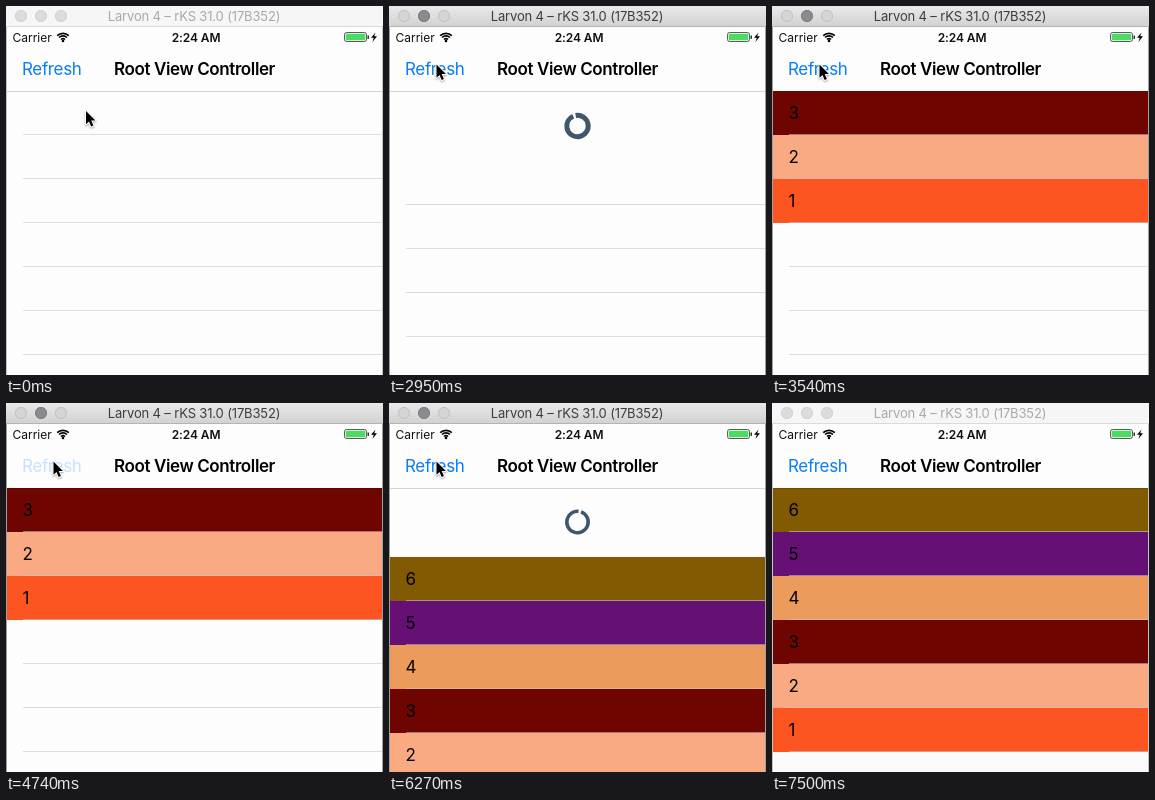
These frames come from a looping animation (377 by 369 pixels, 7540 ms). An HTML page with a canvas:

```html
<!DOCTYPE html>
<html lang="en">
<head>
<meta charset="utf-8">
<title>Pull to refresh</title>
<style>
  html, body { margin: 0; width: 100%; height: 100%; overflow: hidden; background: #fdfdfd; }
  canvas { display: block; width: 377px; height: 369px; }
</style>
</head>
<body>
<canvas></canvas>
<script>
const W = 377, H = 369, LOOP = 7540;
const NAV_BOTTOM = 85, ROW = 44, PULL = 70;
const PRESSES = [1530, 4740];
const FOCUS_START = 1530, FOCUS_END = 7500;
const LOADED = 1500, CLOSE_TIME = 430;
const OPEN = 225, OPEN_TIME = 400;
const FONT = 'Inter, Roboto, sans-serif';
const ROW_COLORS = ['#fc5522', '#f9aa82', '#6e0500', '#ec9b5c', '#661076', '#815a02'];
// time, x, y of the pointer tip
const POINTER = [
  [60, 80, 105], [230, 62, 89], [340, 44, 72], [460, 32, 60], [580, 38, 57],
  [700, 46, 57], [880, 46, 57], [1180, 47.5, 58.5]
];

const canvas = document.querySelector('canvas');
const ctx = canvas.getContext('2d');
const scale = window.devicePixelRatio || 1;
canvas.width = W * scale;
canvas.height = H * scale;

const clamp = v => Math.max(0, Math.min(1, v));
const ease = v => { const p = clamp(v); return p * p * (3 - 2 * p); };

function rect(x, y, w, h, color) {
  ctx.fillStyle = color;
  ctx.fillRect(x, y, w, h);
}

function text(str, x, y, size, color, { weight = 400, align = 'left', spacing = 0 } = {}) {
  ctx.font = `${weight} ${size}px ${FONT}`;
  ctx.textAlign = align;
  ctx.letterSpacing = spacing + 'px';
  ctx.fillStyle = color;
  ctx.fillText(str, x, y);
}

function arc(x, y, r, from, to, width, color) {
  ctx.beginPath();
  ctx.arc(x, y, r, from, to);
  ctx.lineWidth = width;
  ctx.strokeStyle = color;
  ctx.stroke();
}

function polygon(points) {
  ctx.beginPath();
  points.forEach(([x, y]) => ctx.lineTo(x, y));
  ctx.closePath();
}

function titleBar(active) {
  const fill = ctx.createLinearGradient(0, 0, 0, 20);
  fill.addColorStop(0, active ? '#e9e9e9' : '#f6f6f6');
  fill.addColorStop(1, active ? '#d2d2d2' : '#f6f6f6');
  rect(0, 0, W, 20, fill);
  rect(0, 20, W, 1, active ? '#b4b4b4' : '#dadada');
  [15, 35, 55].forEach((x, i) => {
    const dark = active && i === 1;
    ctx.beginPath();
    ctx.arc(x, 10, 6, 0, 7);
    ctx.fillStyle = dark ? '#8b8b8d' : active ? '#d5d5d5' : '#dcdcdc';
    ctx.fill();
    arc(x, 10, 5.5, 0, 7, 1, dark ? '#808082' : active ? '#c0c0c0' : '#d1d1d1');
  });
  text('Larvon 4 – rKS 31.0 (17B352)', 188, 15, 13, active ? '#3d3d3d' : '#a9a9a9',
    { align: 'center', spacing: -0.15 });
}

function statusBar() {
  text('Carrier', 6.5, 35.5, 12, '#111');
  text('2:24 AM', 190, 35.5, 12, '#111', { weight: 600, align: 'center', spacing: -0.1 });

  const up = -Math.PI / 2;
  [3.6, 6.4, 9].forEach(r => arc(57, 35.5, r - 0.8, up - 0.78, up + 0.78, 1.7, '#000'));
  ctx.beginPath();
  ctx.arc(57, 35, 1.3, 0, 7);
  ctx.fillStyle = '#000';
  ctx.fill();

  ctx.beginPath();
  ctx.roundRect(338.5, 26.5, 22, 9, 2);
  ctx.lineWidth = 0.8;
  ctx.strokeStyle = '#333';
  ctx.stroke();
  rect(339.7, 27.7, 19.6, 6.6, '#4cd964');
  rect(361.5, 29.5, 1.5, 3.4, '#333');
  polygon([[369.5, 26.5], [365, 31.8], [367.8, 31.8], [366.4, 36], [371, 30.2], [368.2, 30.2]]);
  ctx.fillStyle = '#000';
  ctx.fill();
}

function navBar(t) {
  rect(0, 21, W, NAV_BOTTOM - 21, '#fdfdfd');
  rect(0, NAV_BOTTOM, W, 1, 'rgba(0,0,0,.17)');
  statusBar();
  const dim = Math.max(...PRESSES.map(p => t < p ? 0 : 1 - ease((t - p - 200) / 100)));
  ctx.globalAlpha = 1 - 0.78 * dim;
  text('Refresh', 16, 69, 17, '#0a7cf8', { spacing: -0.35 });
  ctx.globalAlpha = 1;
  text('Root View Controller', 188.5, 69, 17, '#000',
    { weight: 600, align: 'center', spacing: -0.39 });
}

function spinner(elapsed, offset) {
  const turn = (-107 + 0.264 * (elapsed - 1420)) * Math.PI / 180;
  const width = 6 + 3 * Math.cos(1.91 + (elapsed - 1420) * 2 * Math.PI / 1080);
  const gap = 0.12;
  arc(188.5, NAV_BOTTOM - 35 + offset, 10.7, turn + gap, turn - gap + 2 * Math.PI, width, '#3f566d');
}

function table(t, active) {
  rect(0, NAV_BOTTOM, W, H, active || t < FOCUS_START ? '#fdfdfd' : '#fafafa');
  let offset = 0, rows = 0;
  for (const press of PRESSES) {
    const e = t - press;
    if (e >= LOADED) rows += 3;
    const pull = PULL * (ease((e - OPEN) / OPEN_TIME) - ease((e - LOADED) / CLOSE_TIME));
    if (pull > 0) {
      offset = Math.round(pull);
      spinner(e, offset);
    }
  }
  for (let i = 0; i < 7; i++) {
    const y = NAV_BOTTOM + offset + i * ROW;
    const number = rows - i;
    if (number > 0) {
      rect(1, y, W - 2, ROW, ROW_COLORS[number - 1]);
      text(String(number), 16.5, y + 28, 17, '#000');
    }
    rect(17, y + ROW - 1, W - 18, 1, 'rgba(200,199,204,.6)');
  }
}

function pointer(t) {
  let next = POINTER.findIndex(k => k[0] > t);
  if (next < 0) next = POINTER.length - 1;
  const b = POINTER[next], a = POINTER[Math.max(0, next - 1)];
  const p = a === b ? 0 : clamp((t - a[0]) / (b[0] - a[0]));
  ctx.save();
  ctx.translate(a[1] + (b[1] - a[1]) * p, a[2] + (b[2] - a[2]) * p);
  polygon([[0, 0], [0, 13.2], [3, 10.4], [5.2, 15.5], [7.4, 14.6], [5.2, 9.6], [9.4, 9.6]]);
  ctx.lineJoin = 'round';
  ctx.lineWidth = 2;
  ctx.strokeStyle = '#fff';
  ctx.shadowColor = 'rgba(0,0,0,.35)';
  ctx.shadowBlur = 2 * scale;
  ctx.shadowOffsetY = scale;
  ctx.stroke();
  ctx.shadowColor = 'transparent';
  ctx.fillStyle = '#000';
  ctx.fill();
  ctx.restore();
}

function draw(now) {
  const t = now % LOOP;
  const active = t >= FOCUS_START && t < FOCUS_END;
  ctx.setTransform(scale, 0, 0, scale, 0, 0);
  table(t, active);
  navBar(t);
  titleBar(active);
  const edge = active ? '#a0a0a0' : '#c4c4c4';
  rect(0, 21, 1, H, edge);
  rect(W - 1, 21, 1, H, edge);
  if (t < FOCUS_END) pointer(t);
}

const start = performance.now();
function tick() {
  draw(performance.now() - start);
  requestAnimationFrame(tick);
}
tick();
</script>
</body>
</html>
```
